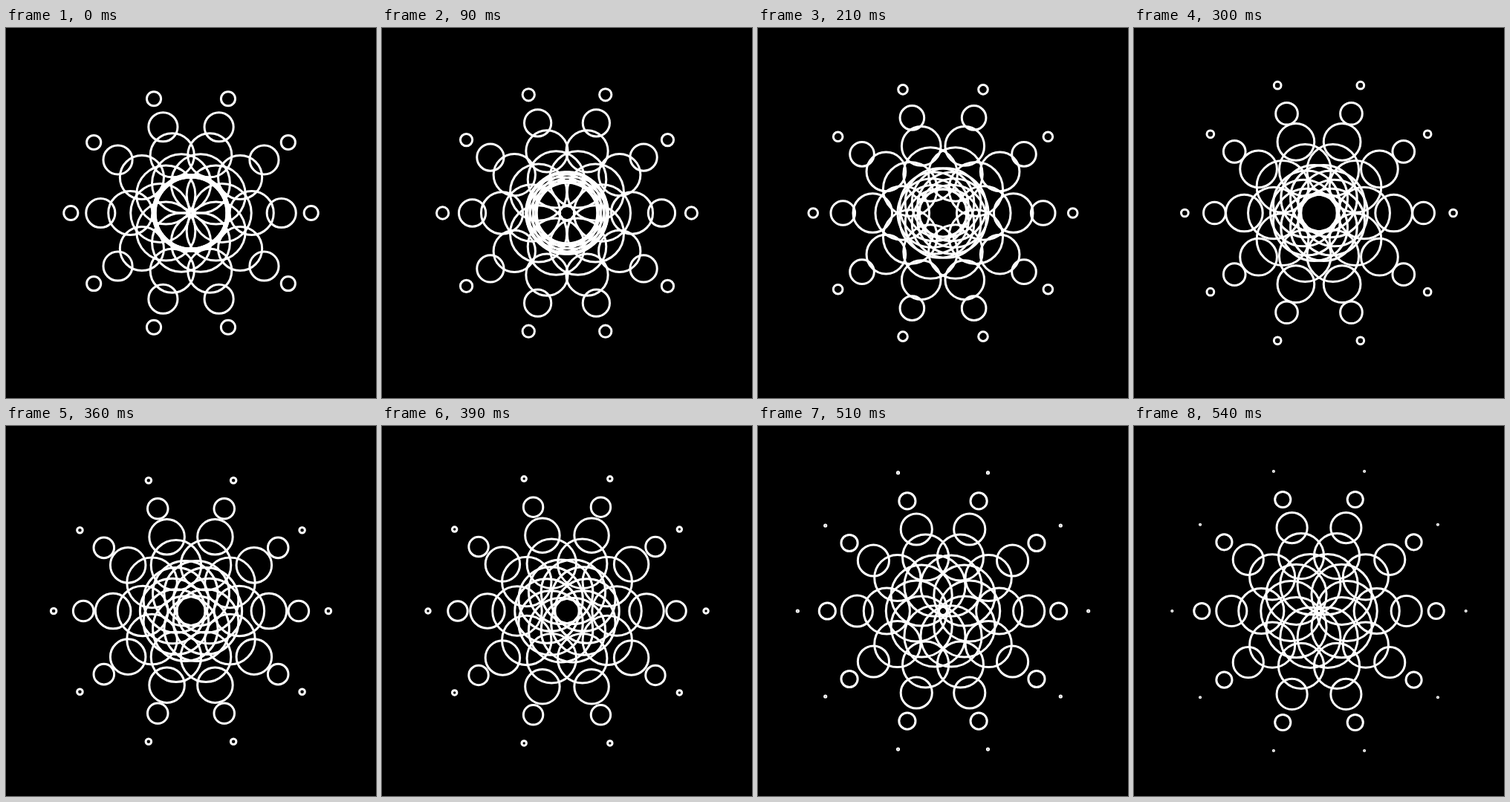
An HTML page with a canvas for the animation above (0.57 s loop, 498 by 498 pixels).

```html
<!DOCTYPE html>
<html lang="en">
<head>
<meta charset="utf-8">
<title>Circle mandala</title>
<style>
  html, body { margin: 0; width: 100%; height: 100%; overflow: hidden; background: #000; }
  canvas { display: block; }
</style>
</head>
<body>
<canvas id="stage" width="498" height="498"></canvas>
<script>
  const ctx = document.getElementById('stage').getContext('2d');
  const SIZE = 498, CENTER = SIZE / 2, ARMS = 10, RINGS = 5, GAP = 40;
  const STEP_MS = 30, STEPS = 19, START = 1.7, SPEED = 2, LAG = 1.1;
  const HALF_LINE = 1.5, MIN_HOLE = 0.5;

  function circle(x, y, r) {
    const outer = r + HALF_LINE;
    const inner = Math.max(r - HALF_LINE, MIN_HOLE); // the smallest rings keep a pinhole
    ctx.lineWidth = outer - inner;
    ctx.beginPath();
    ctx.arc(x, y, (outer + inner) / 2, 0, Math.PI * 2);
    ctx.stroke();
  }

  // steady drift that falls slightly behind mid-loop, then catches up
  function travel(step) {
    return START + SPEED * step - LAG * Math.sin(Math.PI * step / (STEPS - 1)) ** 2;
  }

  function draw(step) {
    ctx.fillStyle = '#000';
    ctx.fillRect(0, 0, SIZE, SIZE);
    ctx.strokeStyle = '#fff';
    for (let ring = 0; ring < RINGS; ring++) {
      // circles shrink as they move outward
      const dist = travel(step) + GAP * ring;
      const radius = 50 - dist / 4;
      for (let arm = 0; arm < ARMS; arm++) {
        const a = arm * Math.PI * 2 / ARMS;
        circle(CENTER + dist * Math.cos(a), CENTER + dist * Math.sin(a), radius);
      }
    }
  }

  function tick() {
    draw(Math.floor(performance.now() / STEP_MS) % STEPS);
    requestAnimationFrame(tick);
  }
  tick();
</script>
</body>
</html>
```
